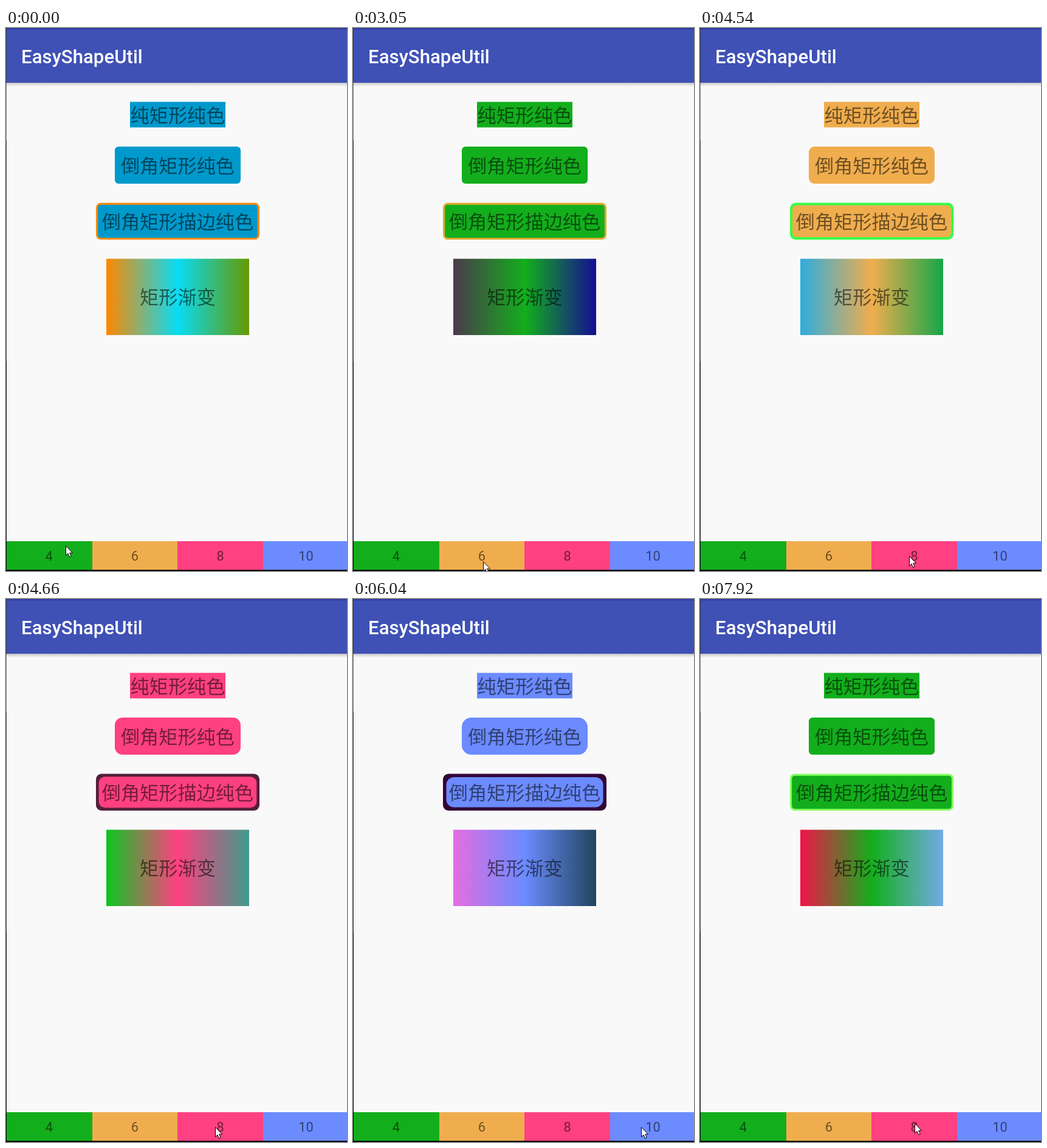
An HTML page for the animation above (8 s loop, 561x893 px).

```html
<!DOCTYPE html>
<html lang="zh-CN">
<head>
<meta charset="utf-8">
<title>EasyShapeUtil</title>
<style>
  html, body { margin: 0; width: 100%; height: 100%; overflow: hidden; background: #f9f9f9; }
  svg { display: block; width: 561px; height: 893px; }
  text { font: 31.2px "Noto Sans CJK SC", "Noto Sans CJK", sans-serif; text-anchor: middle; fill-opacity: .54; }
  #title { font: 500 31.2px Roboto, sans-serif; text-anchor: start; fill: #fff; fill-opacity: 1; }
  #tabs text { font: 21.8px Roboto, sans-serif; }
</style>
</head>
<body>
<svg viewBox="0 0 561 893">
  <defs>
    <linearGradient id="blend"><stop/><stop offset=".5"/><stop offset="1"/></linearGradient>
    <linearGradient id="shade" x2="0" y2="1">
      <stop stop-color="#bdbdbd"/><stop offset=".4" stop-color="#dcdcdc"/><stop offset="1" stop-color="#f4f4f4"/>
    </linearGradient>
  </defs>
  <rect width="561" height="893" fill="#f9f9f9"/>
  <rect y="90" width="561" height="6" fill="url(#shade)"/>
  <rect width="561" height="90" fill="#3f51b5"/>
  <rect width="561" height="2.5" fill="#2f3e9e"/>
  <text id="title" x="25" y="58">EasyShapeUtil</text>

  <rect class="fill" x="204" y="121.5" width="157" height="42"/>
  <rect class="fill" id="round" x="179" y="195" width="207" height="61"/>
  <rect id="edge"/>
  <rect class="fill" id="inner"/>
  <rect x="165" y="379.5" width="235" height="125.5" fill="url(#blend)"/>
  <text x="282.5" y="155">纯矩形纯色</text>
  <text x="282.5" y="238">倒角矩形纯色</text>
  <text x="282.5" y="330">倒角矩形描边纯色</text>
  <text x="282.5" y="454">矩形渐变</text>

  <g id="tabs"></g>
  <path d="M0 891h561v2H0z"/>
  <path d="M0 90h1v95H0z" fill="#777"/>
  <path d="M0 0h1v90H0zM0 185h1v363H0z" fill="#2c3040"/>
  <path d="M0 548h1v345H0z"/>
  <path id="cursor" d="M.5 .8V16.5L4 13.2L6.6 19.2L9.2 18L6.7 12.2H11.5Z" fill="#fff" stroke="#000" stroke-linejoin="round"/>
</svg>
<script>
const LOOP = 8000, TICK = 125, DP = 1.5625;
const tabs = { 4: '#13ae1c', 6: '#f0ad4e', 8: '#ff4081', 10: '#6b8bff' };
const $ = id => document.getElementById(id);
const set = (el, attrs) => { for (const k in attrs) el.setAttribute(k, attrs[k]); };

// each press of a tab sets the corner size and fill, with new gradient ends and edge colour
const looks = [
  { at: 0, size: 4, fill: '#0099cc', mid: '#08dcf4', left: '#ff8800', right: '#669900', edge: '#ff8a0a' },
  { at: 1410, size: 4, left: '#4b3a4b', right: '#150d94', edge: '#e2a92e' },
  { at: 3190, size: 6, left: '#2eadde', right: '#15a648', edge: '#39ff45' },
  { at: 4660, size: 8, left: '#0bc720', right: '#3f9b8b', edge: '#52203b' },
  { at: 6040, size: 10, left: '#e46de0', right: '#20455c', edge: '#330638' },
  { at: 7680, size: 4, left: '#f2134a', right: '#72abe6', edge: '#83fd5d' }
];

// pointer moves: first step, last step, destination
const moves = [
  { from: 0, to: 0, x: 98, y: 851 },
  { from: 150, to: 510, x: 79, y: 879 },
  { from: 2220, to: 2610, x: 214, y: 877 },
  { from: 4030, to: 4540, x: 344, y: 868 },
  { from: 5340, to: 5890, x: 474, y: 868 },
  { from: 6870, to: 7410, x: 71, y: 858 },
  { from: 7800, to: 7920, x: 353, y: 862 }
];

Object.entries(tabs).sort((a, b) => a[0] - b[0]).forEach(([label, color], i) => {
  const left = Math.round(1 + i * 140.6);
  $('tabs').innerHTML += `<rect x="${left}" y="844" width="${561 - left}" height="47" fill="${color}"/>
    <text x="${71 + i * 140.8}" y="876">${label}</text>`;
});

function box(id, inset, rx) {
  set($(id), { x: 148 + inset, y: 287.5 + inset, width: 269 - 2 * inset, height: 60.5 - 2 * inset, rx });
}

function paint({ size, fill = tabs[size], mid = fill, left, right, edge }) {
  const radius = size * DP, stroke = (size / 4 + 1) * DP;
  document.querySelectorAll('.fill').forEach(el => set(el, { fill }));
  document.querySelectorAll('#blend stop').forEach((el, i) => set(el, { 'stop-color': [left, mid, right][i] }));
  set($('round'), { rx: radius });
  set($('edge'), { fill: edge });
  box('edge', 0, Math.min(9, radius + stroke / 2));
  box('inner', stroke, radius - stroke / 2);
}

// the pointer advances in equal steps, the first one at once
function pointer(t) {
  const i = moves.findLastIndex(m => m.from <= t);
  const m = moves[i], prev = moves[Math.max(0, i - 1)];
  const gaps = Math.round((m.to - m.from) / TICK);
  const step = t >= m.to ? gaps : Math.floor((t - m.from) / (m.to - m.from) * gaps);
  const p = (step + 1) / (gaps + 1);
  return ['x', 'y'].map(k => Math.round(prev[k] + (m[k] - prev[k]) * p));
}

let shown;
const start = performance.now();
function frame() {
  const t = (performance.now() - start) % LOOP;
  const look = looks.findLast(l => l.at <= t);
  if (look !== shown) paint(shown = look);
  set($('cursor'), { transform: `translate(${pointer(t)})` });
  requestAnimationFrame(frame);
}
frame();
</script>
</body>
</html>
```
